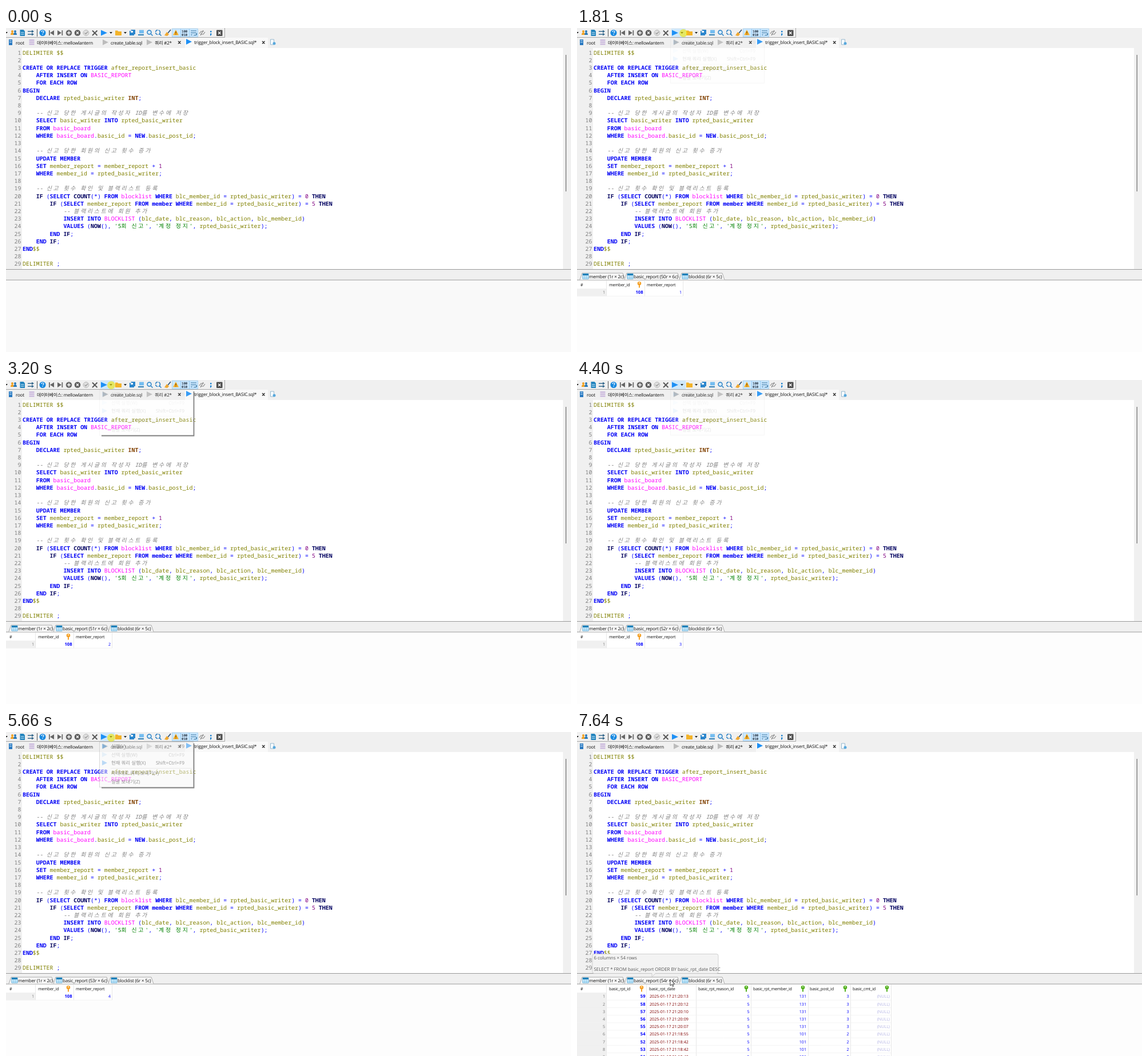
Animation, 988 px wide and 567 px high, one loop 8 s. Source, as an HTML page:

```html
<!DOCTYPE html>
<html lang="ko">
<head>
<meta charset="utf-8">
<title>SQL trigger demo</title>
<style>
html, body { margin: 0; width: 100%; height: 100%; overflow: hidden; background: #f0f0f0; }
svg { display: block; }
text { font: 8px "Open Sans", "Noto Sans CJK KR", "Noto Sans CJK", sans-serif; letter-spacing: -.2px; fill: #111; white-space: pre; text-rendering: geometricPrecision; }
.end { text-anchor: end; }
.code, .code tspan { font: 9.92px "Noto Sans Mono", "Noto Sans CJK KR", "Noto Sans CJK", monospace; letter-spacing: 0; }
.code .kw, .code .fn, .code .type { font-weight: bold; }
.kw { fill: #0000f5; } .fn { fill: #000060; } .type { fill: #804000; }
.id { fill: #808000; } .table { fill: #f0f; } .num { fill: #800080; }
.sym { fill: #00f; } .str { fill: #008000; } .line { fill: #808080; }
.code .note { fill: #808080; font-style: italic; }
.code .ko { letter-spacing: 2.75px; }
.menu text { font-size: 8.4px; letter-spacing: 0; fill: #222; }
.menu .off { fill: #a0a0a0; }
.grid text { font-size: 7.2px; }
.grid .cell { letter-spacing: 0; fill: #00f; }
.grid .key { font-weight: bold; font-size: 7.6px; }
.grid .date { fill: #800000; }
.grid .null { fill: #b4b4e4; }
.grid .row { fill: #777; }
.tip text { fill: #575757; letter-spacing: -.05px; }
</style>
</head>
<body>
<svg id="stage" width="988" height="567" viewBox="0 0 988 567">
  <rect width="988" height="567" fill="#f0f0f0"/>
  <path d="M382.500 0V16.500H0" fill="none" stroke="#a8a8a8"/>
  <rect id="hover" x="165" y="1" width="25" height="15" fill="#cfe8fb"/>

  <g id="toolbar">
    <g fill="#cce8ff" stroke="#90c8f0" stroke-width=".7">
      <path d="M290.500 1.500h15v14h-15zM305.500 1.500h15v14h-15zM320.500 1.500h15v14h-15z"/>
    </g>
    <path d="M-1 7h4l-2 2.500zM181 7h5l-2.500 3zM206 7h5l-2.500 3z" fill="#222"/>
    <g fill="#f0a020"><circle cx="11" cy="6" r="2"/><path d="M8 12q0-4 3-4t3 4z"/></g>
    <g fill="#2878b8"><circle cx="16" cy="6" r="2"/><path d="M13 12q0-4 3-4t3 4z"/></g>
    <path d="M24.500 3h6l2.500 2.500V14h-8.500z" fill="#2384bd"/>
    <path d="M26 8h5.500M26 11h5.500" stroke="#d8f0ff"/>
    <path d="M38 6h8M38 11h8" stroke="#35688c" stroke-width="1.300"/>
    <path d="M45 3.500l4 2.500-4 2.500zM45 8.500l4 2.500-4 2.500z" fill="#35688c"/>
    <path d="M54.500 2v13" stroke="#555"/>
    <circle cx="64" cy="8.500" r="5.500" fill="#1688e0"/>
    <path d="M62 7q0-2 2-2t2 1.700q0 1-2 2.300M64 10.500v1.500" fill="none" stroke="#fff" stroke-width="1.200"/>
    <path d="M75 4h1.700v9H75zM84 4v9l-7-4.500zM97.500 4h1.700v9h-1.700zM90 4v9l7-4.500z" fill="#666"/>
    <circle cx="110" cy="8.500" r="5.300" fill="#6a6a6a"/><circle cx="125" cy="8.500" r="5.300" fill="#5c5c5c"/>
    <circle cx="140" cy="8.500" r="4.900" fill="#e0e0e0" stroke="#b5b5b5"/>
    <path d="M107 8.500h6M110 5.500v6M123 6.500l4 4m0-4l-4 4" stroke="#fff" stroke-width="1.400"/>
    <path d="M137.500 8.500l2 2 3.500-4" fill="none" stroke="#999" stroke-width="1.300"/>
    <path d="M151 4.500l8.500 8.500m0-8.500L151 13" stroke="#555" stroke-width="1.800"/>
    <path d="M166 3.500v10l11-5z" fill="#1e90f5"/>
    <path d="M191 4.500h4l1.500 1.500h5.500v7H191z" fill="#f3b32a"/>
    <path d="M216 5h8v8h-8zM218 3h8v8h-2" fill="#2c86cc"/><path d="M218 5h4v3h-4z" fill="#fff"/>
    <path d="M233 3.500h8v6h-8z" fill="#74bdf0"/><path d="M231 11h10v2H231z" fill="#2f80b8"/>
    <g fill="#d4ecff" stroke="#2a80c4" stroke-width="1.500">
      <path d="M253.500 10.500l3 3M268.500 10.500l3 3"/><circle cx="250.500" cy="7.500" r="3.500"/><circle cx="265.500" cy="7.500" r="4" fill="none" stroke-dasharray="5 1.500"/>
    </g>
    <path d="M288 3l-5 6" stroke="#33557a" stroke-width="1.800"/><path d="M281 7l4 4-3 3-5-1z" fill="#f0a830"/>
    <path d="M297 3l5 9.500h-10z" fill="#f6ad25"/><path d="M297 6v3.500m0 1v1.200" stroke="#503000"/>
    <text x="307" y="7.500" style="font:bold 6px 'Noto Sans Mono',monospace;fill:#345">100</text>
    <text x="307" y="14" style="font:bold 6px 'Noto Sans Mono',monospace;fill:#345">010</text>
    <path d="M323 5h10M323 8.500h8q2.500 0 2.500 2t-2.500 2h-3M323 12h3" fill="none" stroke="#2f6f9c" stroke-width="1.200"/>
    <path d="M338 10l3-4h5m2 1l-3 4h-5m0 2l5-9" fill="none" stroke="#888" stroke-width="1.200"/>
    <path d="M357 5h2.500v2.500H357zM357 9.500h2.500v2l-1.500 2h-1z" fill="#2384d0"/>
    <rect x="368" y="3.500" width="10.500" height="10.500" rx="1" fill="#4c4c4c"/><path d="M371 6.500l4.500 4.500m0-4.500L371 11" stroke="#fff" stroke-width="1.300"/>
  </g>

  <g id="tabs">
    <rect x="313" y="17" width="145" height="18" fill="#f9f9f9"/>
    <path d="M5 20h6v10H5z" fill="#2878c0"/><path d="M6 22h4M6 25h4" stroke="#d5ecff"/>
    <path d="M40.500 20h9v2.500h-9zM40.500 23.500h9V26h-9zM40.500 27h9v2.500h-9z" fill="#cbb9dd"/>
    <path d="M169 20v10l10-5zM246 20v10l10-5z" fill="#bcbcbc"/>
    <path d="M315 19v10l10-5z" fill="#1e90f5"/>
    <path d="M301 23l4.500 4.500m0-4.500L301 27.500M448 23l4.500 4.500m0-4.500L448 27.500" stroke="#222" stroke-width="1.200"/>
    <path d="M462.500 20h6v9h-6z" fill="#f8fcff" stroke="#7fa8c4" stroke-width=".8"/><circle cx="469" cy="27" r="2.500" fill="#58a8dc"/>
    <text x="17" y="28.500">root</text>
    <text x="54" y="28.500">데이터베이스: mellowlantern</text>
    <text x="183" y="28.500">create_table.sql</text>
    <text x="260" y="28.500">쿼리 #2*</text>
    <text x="329" y="27.500">trigger_block_insert_BASIC.sql*</text>
  </g>

  <rect x="28" y="35" width="946" height="387" fill="#fff"/>
  <rect x="978.500" y="47" width="1.500" height="239" fill="#858585"/>
  <g id="editor"></g>
  <path d="M0 422.500h988" stroke="#999"/>
  <rect y="442" width="988" height="125" fill="#f9f9f9"/>
  <rect id="paper" y="442" width="988" height="125" fill="#fdfdfd"/>
  <path d="M0 441h988" stroke="#a0a0a0"/>
  <g id="results"></g>

  <g id="tip" class="tip">
    <path d="M30 388.500h214q3 0 3 3v28q0 3-3 3H137l-6 6.500v-6.500H30q-3 0-3-3v-28q0-3 3-3z" fill="#f3f3f3" stroke="#c4c4c4" stroke-width=".8"/>
    <text x="29.500" y="398">6 columns × 54 rows</text>
    <text x="29.500" y="418">SELECT * FROM basic_report ORDER BY basic_rpt_date DESC</text>
  </g>

  <path id="shadow" d="M167 97.500h161.500V20" fill="none" stroke="#808080" stroke-width="1.800"/>
  <g id="menu" class="menu"></g>

  <g id="cursor">
    <circle id="press" r="7" fill="#f2e600" opacity="0"/>
    <path id="arrow" d="M0 0V11L2.600 8.600 4.300 12.400 6 11.600 4.300 8H7.800Z" fill="#fff" stroke="#111" stroke-width=".8"/>
    <path id="ibeam" d="M-2.500-5.500h2l.5.500.5-.5h2M0-5V5M-2.500 5.500h2L0 5l.5.500h2" fill="none" stroke="#222"/>
  </g>
</svg>

<script>
const LOOP = 8000;
const $ = id => document.getElementById(id);
const label = (x, y, s, cls = '') => `<text x="${x}" y="${y}" class="${cls}">${s}</text>`;

// Editor
const source = `DELIMITER $$

CREATE OR REPLACE TRIGGER after_report_insert_basic
    AFTER INSERT ON BASIC_REPORT
    FOR EACH ROW
BEGIN
    DECLARE rpted_basic_writer INT;

    -- 신고 당한 게시글의 작성자 ID를 변수에 저장
    SELECT basic_writer INTO rpted_basic_writer
    FROM basic_board
    WHERE basic_board.basic_id = NEW.basic_post_id;

    -- 신고 당한 회원의 신고 횟수 증가
    UPDATE MEMBER
    SET member_report = member_report + 1
    WHERE member_id = rpted_basic_writer;

    -- 신고 횟수 확인 및 블랙리스트 등록
    IF (SELECT COUNT(*) FROM blocklist WHERE blc_member_id = rpted_basic_writer) = 0 THEN
        IF (SELECT member_report FROM member WHERE member_id = rpted_basic_writer) = 5 THEN
            -- 블랙리스트에 회원 추가
            INSERT INTO BLOCKLIST (blc_date, blc_reason, blc_action, blc_member_id)
            VALUES (NOW(), '5회 신고', '계정 정지', rpted_basic_writer);
        END IF;
    END IF;
END$$

DELIMITER ;`;
const CELL = 5.952, PITCH = 13.214;
const kinds = {
  kw: 'CREATE OR REPLACE TRIGGER AFTER INSERT ON FOR EACH ROW BEGIN DECLARE SELECT INTO FROM WHERE NEW UPDATE MEMBER member SET VALUES END',
  fn: 'IF THEN COUNT NOW',
  type: 'INT',
  table: 'BASIC_REPORT basic_board blocklist BLOCKLIST'
};
const kindOf = {};
for (const k in kinds) for (const w of kinds[k].split(' ')) kindOf[w] = k;

const classify = s =>
  s.startsWith('--') ? 'note' : s[0] === "'" ? 'str' : /^\d/.test(s) ? 'num' :
  /^[\w$]/.test(s) ? kindOf[s] || 'id' : 'sym';
const isKo = c => /[가-힣]/.test(c);

function codeLine(line, row) {
  const y = (46.5 + row * PITCH).toFixed(2);
  let col = 0, out = '';
  for (const token of line.match(/--.*|'[^']*'|\$\$|\w+| +|[^\w\s]/g) || []) {
    const kind = classify(token);
    for (const run of token.match(/[가-힣]+|[^가-힣 ]+| +/g)) {
      const ko = isKo(run);
      if (run.trim()) out += `<tspan x="${(29 + col * CELL).toFixed(2)}" class="${kind}${ko ? ' ko' : ''}">${run}</tspan>`;
      col += run.length * (ko ? 2 : 1);
    }
  }
  return label(26.5, y, row + 1, 'code line end') + `<text y="${y}" class="code">${out}</text>`;
}
$('editor').innerHTML = source.split('\n').map(codeLine).join('');

// Dropdown menu
const play = (x, y, o) => `<path d="M${x} ${y - 4.5}v9l9-4.500z" fill="#4d9fe8" opacity="${o}"/>`;
$('menu').innerHTML =
  '<rect x="163.500" y="17.500" width="164" height="79" fill="#f5f5f5" stroke="#b0b0b0"/>' +
  '<rect id="pick" x="166" y="18.500" width="159" height="14" fill="#91c9f7"/>' +
  play(168, 25, 1) + play(168, 39.5, .25) + play(168, 54, .8) +
  '<path d="M183 63.500h142" stroke="#d4d4d4"/>' +
  [[28, '실행(V)', 'F9'], [42.5, '선택 실행(W)', 'Ctrl+F9', 'off'], [57, '현재 쿼리 실행(X)', 'Shift+Ctrl+F9'],
   [75, '차례대로 쿼리 보내기(Y)', ''], [90, '일괄 보내기(Z)', '']]
    .map(([y, name, keys, cls = '']) => label(184, y, name, cls) + label(312, y, keys, cls + ' end')).join('');

// Result tabs and grids
const keyIcon = (x, color) =>
  `<circle cx="${x}" cy="447" r="3.300" fill="${color}"/><path d="M${x} 449v5.500" stroke="${color}" stroke-width="2"/><circle cx="${x}" cy="446" r=".9" fill="#fff"/>`;
const ORANGE = '#f5a22a', GREEN = '#52b01e';
const tableIcon = x =>
  `<path d="M${x} 430h10v9h-10z" fill="#d9f1ff" stroke="#3a9bd0" stroke-width=".8"/><path d="M${x} 430h10v3h-10z" fill="#1c7fb8"/><path d="M${x + 3.5} 433v6m3-6v6M${x} 436h10" stroke="#6cbbe2" stroke-width=".7"/>`;
const resultTab = (x, right, name) =>
  `<path d="M${x} 440.500l4-11.500H${right - 4}l4 11.500" fill="#f7f7f7" stroke="#999" stroke-width=".8"/>` +
  tableIcon(x + 5) + label(x + 16, 437.8, name);
const resultTabs = n =>
  resultTab(5, 84, 'member (1r × 2c)') + resultTab(83, 180, `basic_report (${49 + n}r × 6c)`) + resultTab(179, 258, 'blocklist (6r × 5c)');

const gridFrame = (edges, rows) => {
  const bottom = 456 + rows * 13.2, width = edges[edges.length - 1];
  return `<path d="M0 442h${width}V${bottom}H0z" fill="#fff"/><path d="M0 456h52V${bottom}H0z" fill="#f0f0f0"/>` +
    `<path d="${edges.map(x => `M${x + .5} 442V${bottom}`).join('')}" stroke="#e8e8e8"/>` +
    Array.from({ length: rows }, (_, i) => `<path d="M0 ${469.2 + i * 13.2}H${width}" stroke="#efefef" stroke-width=".7"/>` +
      label(49, (465.3 + i * 13.2).toFixed(1), i + 1, 'row end')).join('') + label(6, 451.5, '#');
};
const memberGrid = n => gridFrame([51, 118, 185], 1) +
  label(56, 451.5, 'member_id') + keyIcon(109, ORANGE) + label(122, 451.5, 'member_report') +
  label(115.5, 465.3, 108, 'cell key end') + label(183, 465.3, n, 'cell end');

const ids = [59, 58, 57, 56, 55, 54, 52, 53, 51];
const times = '20:13 20:12 20:10 20:09 20:07 18:55 18:42 18:42 18:40'.split(' ');
const reportGrid = () => gridFrame([51, 121, 208, 304, 404, 478, 549], 9) +
  [[56, 'basic_rpt_id'], [126, 'basic_rpt_date'], [212, 'basic_rpt_reason_id'], [308, 'basic_rpt_member_id'], [407, 'basic_post_id'], [482, 'basic_cmt_id']]
    .map(([x, s]) => label(x, 451.5, s)).join('') +
  keyIcon(113, ORANGE) + [296, 395, 469, 542].map(x => keyIcon(x, GREEN)).join('') +
  ids.map((id, i) => {
    const y = (465.3 + i * 13.2).toFixed(1), recent = i < 5;
    return label(119.5, y, id, 'cell key end') + label(127, y, `2025-01-17 21:${times[i]}`, 'cell date') +
      label(301.5, y, 5, 'cell end') + label(401, y, recent ? 131 : 101, 'cell end') +
      label(475.5, y, recent ? 3 : 2, 'cell end') + label(547, y, '(NULL)', 'cell null end');
  }).join('');

// Timeline, in ms
const animate = (el, frames) =>
  el.animate(frames.map(([ms, f]) => ({ offset: ms / LOOP, ...f })), { duration: LOOP, iterations: Infinity });
const during = (el, spans, on = 1) => {
  const at = (ms, opacity) => [ms, { opacity, easing: 'step-end' }];
  animate(el, [at(0, 0), ...spans.flatMap(([a, b]) => [at(a, on), at(b, 0)]), at(LOOP, 0)]);
};

const runs = [[940, 2450], [2700, 3670], [3920, 4910], [5160, 6080], [6440, LOOP]];
const TAB_CLICK = 7340;
function addResult(html, span) {
  const g = document.createElementNS('http://www.w3.org/2000/svg', 'g');
  g.setAttribute('class', 'grid');
  g.innerHTML = html;
  $('results').append(g);
  during(g, [span]);
}
runs.forEach(([from, to], i) => {
  addResult(resultTabs(i + 1).replace(/<text /g, '<text style="font-size:8px" '), [from, to]);
  addResult(memberGrid(i + 1), [from, Math.min(to, TAB_CLICK)]);
});
addResult(reportGrid(), [TAB_CLICK, LOOP]);
during($('paper'), [[940, LOOP]]);

// open, shadow, close
const openings = [[60, 90, 640], [1800, 1850, 2440], [3190, 3192, 3660], [4390, 4430, 4900], [5590, 5620, 6050]];
animate($('menu'), [[0, { opacity: 0 }], ...openings.flatMap(([a, , b]) => [
  [a, { opacity: 0 }], [a, { opacity: .12 }], [a + 30, { opacity: .12 }], [a + 130, { opacity: 1 }],
  [b, { opacity: 1 }], [b, { opacity: 0 }]
]), [LOOP, { opacity: 0 }]]);
during($('shadow'), openings.map(([, s, b]) => [s, b]));
during($('pick'), openings.map(([a, , b]) => [a + 190, b]));
during($('hover'), [[0, 640], [1560, 2440], [2770, 3660], [3990, 4900], [5230, 6050]]);
during($('press'), [[30, 110], [600, 640], [1800, 1900], [2400, 2440], [3190, 3270], [3620, 3660],
  [4440, 4490], [4860, 4900], [5590, 5690], [6010, 6050], [7330, 7400]], .6);

const IBEAM = [6470, 7030];
during($('arrow'), [[0, IBEAM[0]], [IBEAM[1], LOOP]]);
during($('ibeam'), [IBEAM]);
animate($('cursor'), [
  [0, 182.5, 11], [200, 182.5, 11], [430, 236, 18], [1330, 236, 18], [1580, 186, 9], [1900, 186, 9],
  [2090, 225, 20], [2550, 225, 20], [2790, 184, 9], [3260, 184, 9], [3410, 215, 20], [3760, 215, 20],
  [4010, 187, 13], [4300, 187, 13], [4390, 186, 11], [4480, 186, 11], [4630, 220, 20], [5000, 220, 20],
  [5250, 184, 10], [5700, 184, 10], [5850, 212, 21], [6420, 212, 21], [6700, 176, 152], [7000, 166, 405],
  [7180, 163, 433], [LOOP, 163, 433]
].map(([ms, x, y]) => [ms, { transform: `translate(${x}px, ${y}px)` }]));

animate($('tip'), [[0, { opacity: 0 }], [7500, { opacity: 0 }], [7630, { opacity: 1 }], [LOOP, { opacity: 1 }]]);
</script>
</body>
</html>
```
